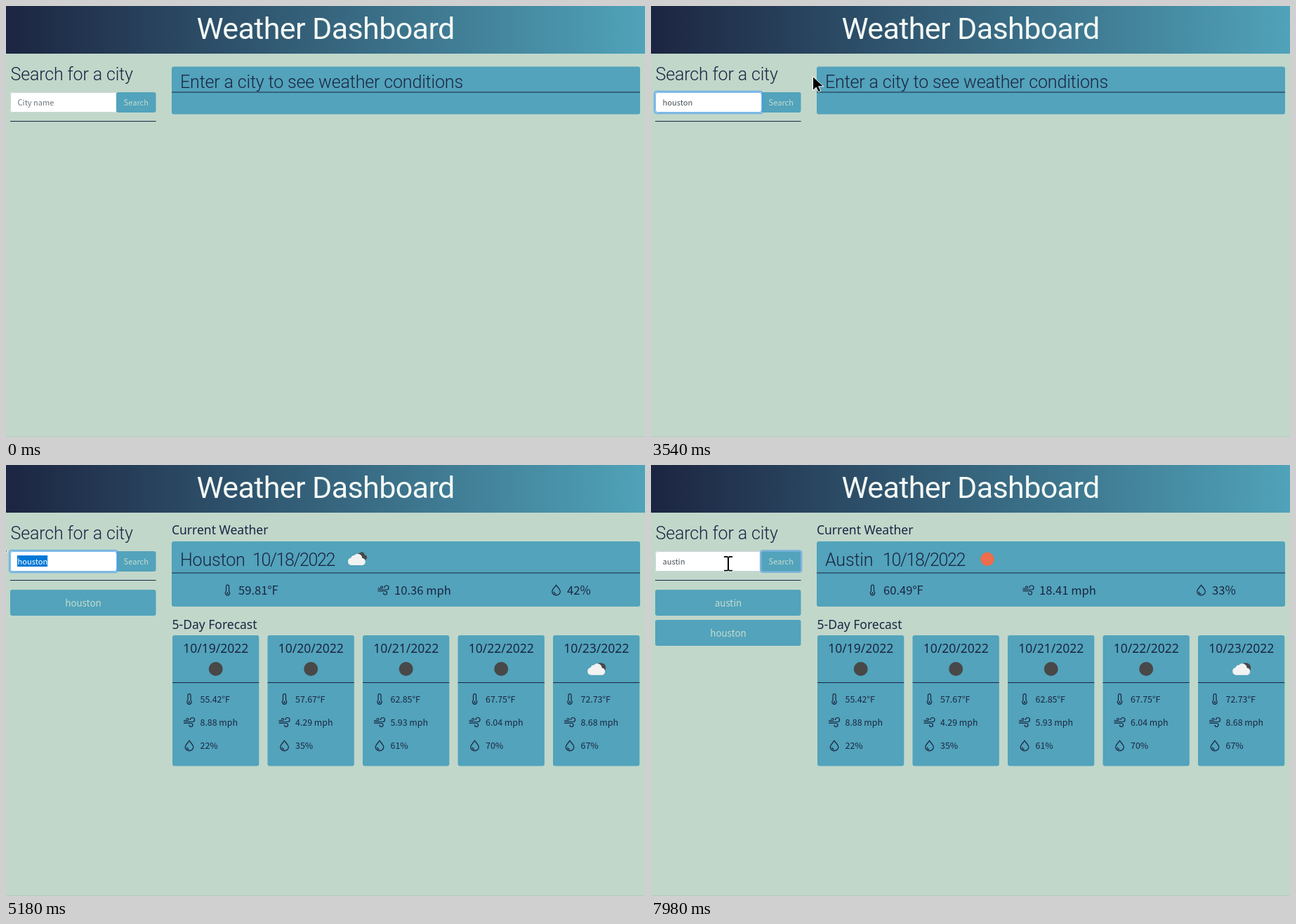
These frames come from a looping animation (910 px wide and 615 px high, 8 s). An HTML page:

```html
<!DOCTYPE html>
<html lang="en">
<head>
<meta charset="utf-8">
<title>Weather Dashboard</title>
<style>
html, body { margin: 0; width: 100%; height: 100%; overflow: hidden; background: #c1d7ca; }
svg { display: block; width: 100%; height: 100%; }
text { fill: #1c2541; white-space: pre; }
.head { font-family: Roboto, Inter, sans-serif; font-size: 25px; font-weight: 300; letter-spacing: -.006em; }
.title { font-size: 43px; font-weight: 400; letter-spacing: -.014em; fill: #f4faf6; }
.date { letter-spacing: -.055em; }
.sub { font-family: "Noto Sans", "Open Sans", sans-serif; font-size: 17.5px; }
.body { font-family: "Noto Sans CJK JP", "Noto Sans CJK SC", "Noto Sans CJK", "Noto Sans", sans-serif; font-size: 12.4px; }
.big { font-size: 16.6px; }
.field { font-size: 11.1px; }
.item { font-size: 13.4px; }
.pale { fill: #c5dccf; }
.mid { text-anchor: middle; }
.line { fill: none; stroke: #1c2541; stroke-width: 1.2; stroke-linecap: round; }
.cur { fill: #000; stroke: #fff; stroke-width: 1; stroke-linejoin: round; }
</style>
</head>
<body>
<svg id="stage" viewBox="0 0 910 615" preserveAspectRatio="none"></svg>
<script>
const LOOP = 8000, STEP = 82;
const NAVY = '#1c2541', BLUE = '#52a3bb', DARK = '#484848';
const stage = document.getElementById('stage');

// markup helpers
const rect = (x, y, w, h, fill, more = '') =>
  `<rect x="${x}" y="${y}" width="${w}" height="${h}" fill="${fill}" ${more}/>`;
const text = (x, y, cls, str, more = '') => `<text x="${x}" y="${y}" class="${cls}" ${more}>${str}</text>`;
const group = (id, body, more = '') => `<g id="${id}" ${more}>${body}</g>`;
const disc = (x, y, r, fill) => `<circle cx="${x}" cy="${y}" r="${r}" fill="${fill}"/>`;
const panel = (x, y, w, h) => rect(x, y, w, h, BLUE, 'rx="3"');
const rule = (x, y, w) => rect(x, y, w, 1, NAVY);

const ICONS = {
  temp: '<path class="line" d="M6 2.7a2 2 0 0 1 4 0v6.9a3.2 3.2 0 1 1-4 0z"/><circle cx="8" cy="12.2" r="1.2" fill="#1c2541"/>',
  wind: '<path class="line" d="M9.5 4.5a3 3 0 1 1 3 3H.5M4 4a1.5 1.5 0 1 1 1.5 1.5h-5M.5 9.5h10a2.5 2.5 0 1 1-2.5 2.5"/>',
  drop: '<path class="line" d="M8 .9C5.8 4.2 2.2 7 2.2 10a5.8 5.3 0 0 0 11.6 0C13.8 7 10.2 4.2 8 .9zM4.7 10.5a3 3 0 0 0 2.6 2.7"/>'
};
const icon = (name, cx, cy) => `<g transform="translate(${cx - 8} ${cy - 8})">${ICONS[name]}</g>`;

const CLOUD = 'M5 17a5 5 0 0 1-.4-9.9A4.3 4.3 0 0 1 9 3.7 6 6 0 0 1 19.5 7.4a4.9 4.9 0 0 1 .6 9.6z';
const cloud = (x, y, s, fill) =>
  `<path d="${CLOUD}" fill="${fill}" transform="translate(${x} ${y}) scale(${s})"/>`;

function card(i, [temp, wind, wet, cloudy]) {
  const x = 237 + i * 135.5, mid = x + 61.7;
  const row = (name, y, str) => icon(name, x + 24, y) + text(x + 39.5, y + 4.6, 'body', str);
  const sky = cloudy
    ? disc(mid + 6.2, 289.5, 7.3, DARK) + cloud(mid - 13, 281.5, 1.07, '#f2f2f2')
    : disc(mid, 291, 10, DARK);
  return panel(x, 243, 123.3, 186.5) + text(mid, 268, 'sub mid', `10/${19 + i}/2022`) + sky +
    rule(x, 310, 123.3) + row('temp', 334, temp + '°F') +
    row('wind', 367, wind + ' mph') + row('drop', 400.5, wet + '%');
}

function now(id, city, dateX, sky, temp, wind, wet) {
  return group(id, text(248, 144, 'head', city) + text(dateX, 144, 'head date', '10/18/2022') + sky +
    text(331, 185, 'body big', temp + '°F') + text(553, 185, 'body big', wind + ' mph') +
    text(799, 185, 'body big', wet + '%'));
}

const item = (id, y) => group(id, panel(6, y, 207.5, 37) +
  text(110, y + 24, 'body item pale mid', ''));
const outline = (x, y, w, h, color, width, more = '') =>
  rect(x, y, w, h, 'none', `rx="3" stroke="${color}" stroke-width="${width}" ${more}`);

const days = [
  ['55.42', '8.88', 22], ['57.67', '4.29', 35], ['62.85', '5.93', 61],
  ['67.75', '6.04', 70], ['72.73', '8.68', 67, true]
];

stage.innerHTML =
  `<defs><linearGradient id="sky"><stop stop-color="${NAVY}"/><stop offset="1" stop-color="#50a3b9"/></linearGradient></defs>` +
  rect(0, 0, 910, 615, '#c1d7ca') + rect(0, 614, 910, 1, '#b5cbc0') +
  rect(0, 0, 910, 68, 'url(#sky)') +
  text(455, 46.5, 'head title mid', 'Weather Dashboard') +
  text(6.5, 105.5, 'head', 'Search for a city') +
  rect(6, 123, 152, 29, '#fff', 'rx="3"') + outline(6.5, 123.5, 151, 28, '#ced4da', 1) +
  rect(157, 123, 56.5, 29, BLUE, 'id="button" rx="3"') +
  text(185.3, 142, 'body field pale mid', 'Search') +
  group('inputRing', outline(4.9, 121.9, 153.9, 31.2, '#3f9bf2', 2.3, 'opacity=".55"') +
    outline(6.5, 123.5, 151, 28, '#86bdf0', 1)) +
  outline(156.2, 122.2, 58, 30.6, '#80b4dc', 2.6, 'id="buttonRing"') +
  rect(16, 129, 43.5, 16, '#0078d7', 'id="selection"') +
  text(16.5, 142, 'body field', '', 'id="entry"') +
  rect(16, 129, 1, 16, '#000', 'id="caret"') +
  rule(6, 164, 207.5) +
  item('first', 178) + item('second', 221) +
  group('empty', panel(236, 86.5, 667, 68) + rule(236, 122.5, 667) +
    text(248, 117, 'head', 'Enter a city to see weather conditions')) +
  group('current', text(236, 99, 'sub', 'Current Weather') + panel(236, 109, 667, 93) + rule(236, 153.5, 667) +
    icon('temp', 315.5, 178.5) + icon('wind', 537.5, 178.5) + icon('drop', 783.5, 178.5) +
    now('houston', 'Houston', 351, cloud(496.5, 123, .74, DARK) + cloud(486.5, 125, 1.06, '#f2f2f2'), '59.81', '10.36', 42) +
    now('austin', 'Austin', 330, disc(479, 134.3, 9.7, '#ec6e4c'), '60.49', '18.41', 33)) +
  group('forecast', text(236.5, 233.5, 'sub', '5-Day Forecast') + days.map((d, i) => card(i, d)).join('')) +
  group('pointer', '<circle id="press" r="15" fill="#c6dc28" opacity=".7"/>' +
    '<path id="arrow" class="cur" d="M.5.5V20.5l4.700-4.3 3.2 6.6 3.5-1.6-3.2-6.4h7.1z"/>' +
    '<path id="beam" class="cur" d="M-6.5-10.5h5L0-9.5l1.5-1h5v2.800H1.500V9.300h5V12h-5L0 11l-1.500 1h-5V9.300h5V-7.700h-5z"/>' +
    '<g id="hand"><path class="cur" d="M-.5 3q2-3 4 0v7q2-1.500 3.500.5 2-1.300 3.500.8 3.500-.8 3.500 3.200v5q0 3-2 5v3.500H0V24.500l-7-9q-1.500-3.500 1.500-3.500l5 3.500z"/>' +
    '<path d="M3.500 10v5M7 11v4.500M10.500 12v4" stroke="#fff"/></g>');

const el = {};
for (const node of stage.querySelectorAll('[id]')) el[node.id] = node;
const show = (node, on) => node.setAttribute('display', on ? 'inline' : 'none');
const within = (t, ...spans) => spans.some(([a, b]) => t >= a && t < b);

// pointer legs: start time, steps, from, to, easing
const smooth = u => u * u * (3 - 2 * u), even = u => u;
const LEGS = [
  [240, 6, [833, 589], [511, 351], smooth],
  [1070, 7, [511, 351], [145, 140], smooth],
  [3540, 1, [230, 100], [302, 104], even],
  [3788, 5, [302, 104], [191, 142], smooth],
  [4518, 2, [191, 142], [156, 147], smooth],
  [4680, 1, [156, 147], [100, 138], even],
  [4850, 4, [100, 138], [-13, 109], smooth],
  [6778, 6, [-13, 109], [189, 142], smooth],
  [7490, 3, [189, 142], [110, 140], smooth]
];

function pointerAt(t) {
  const leg = LEGS.filter(l => t >= l[0]).pop();
  if (!leg) return null;
  const [start, steps, from, to, ease] = leg;
  const u = ease(Math.min(1, Math.floor((t - start) / STEP + .03) / steps));
  return from.map((v, i) => v + (to[i] - v) * u);
}

const typed = (word, times, t) => word.slice(0, times.filter(at => t >= at).length);
const HOUSTON = [2730, 2810, 2890, 2970, 3050, 3130, 3130];
const AUSTIN = [5760, 5930, 6010, 6180, 6180, 6260];

function drawField(t) {
  const value = t < 5760 ? typed('houston', HOUSTON, t) : typed('austin', AUSTIN, t);
  const selected = within(t, [4930, 5760]);
  el.entry.textContent = value || 'City name';
  el.entry.style.fill = selected ? '#fff' : value ? '#495057' : '#6c757d';
  const end = value ? el.entry.getComputedTextLength() : 0;
  const from = t < 5010 ? end * .5 : 0;
  el.selection.setAttribute('x', 16 + from);
  el.selection.setAttribute('width', Math.max(0, end + .5 - from));
  show(el.selection, selected);
  el.caret.setAttribute('x', 16 + Math.round(end));
  show(el.caret, within(t, [1800, 2300], [2550, 3290], [3870, 4270], [4760, 4930], [5760, 6510], [6860, 7340]));

  // the rings fade over as the button takes the focus
  const fading = within(t, [4270, 4430], [7340, 7420]);
  show(el.inputRing, fading || within(t, [1800, 4270], [4760, 7340]));
  el.inputRing.setAttribute('opacity', fading ? .3 : 1);
  show(el.buttonRing, within(t, [4350, 4760], [7340, LOOP]));
  el.buttonRing.setAttribute('opacity', fading ? .5 : 1);
}

function drawPointer(t) {
  const p = pointerAt(t);
  show(el.pointer, p);
  let kind = '';
  if (p) {
    const [x, y] = p, inRow = y > 122 && y < 153;
    kind = inRow && x > 157 && x < 214 ? 'hand' : inRow && x > 5 && x <= 157 ? 'beam' : 'arrow';
    el.pointer.setAttribute('transform', `translate(${Math.round(x)} ${Math.round(y)})`);
  }
  for (const k of ['arrow', 'beam', 'hand']) show(el[k], k === kind);
  show(el.press, within(t, [1720, 1880], [4270, 4430], [4760, 5090], [7340, 7490]));
  el.button.setAttribute('fill', kind === 'hand' || within(t, [4350, 4760]) ? '#459db5' : BLUE);
}

function draw(t) {
  drawField(t);
  drawPointer(t);
  const listed = t >= 7490;
  show(el.first, t >= 4430);
  show(el.second, listed);
  el.first.lastChild.textContent = listed ? 'austin' : 'houston';
  el.second.lastChild.textContent = 'houston';
  const loaded = t >= 5010;
  show(el.empty, !loaded);
  show(el.current, loaded);
  show(el.houston, t < 7900);
  show(el.austin, t >= 7900);
  show(el.forecast, t >= 4600);
  el.forecast.setAttribute('transform', `translate(0 ${loaded ? 0 : -47.5})`);
}

const begin = performance.now();
function tick() {
  draw((performance.now() - begin) % LOOP);
  requestAnimationFrame(tick);
}
tick();
</script>
</body>
</html>
```
